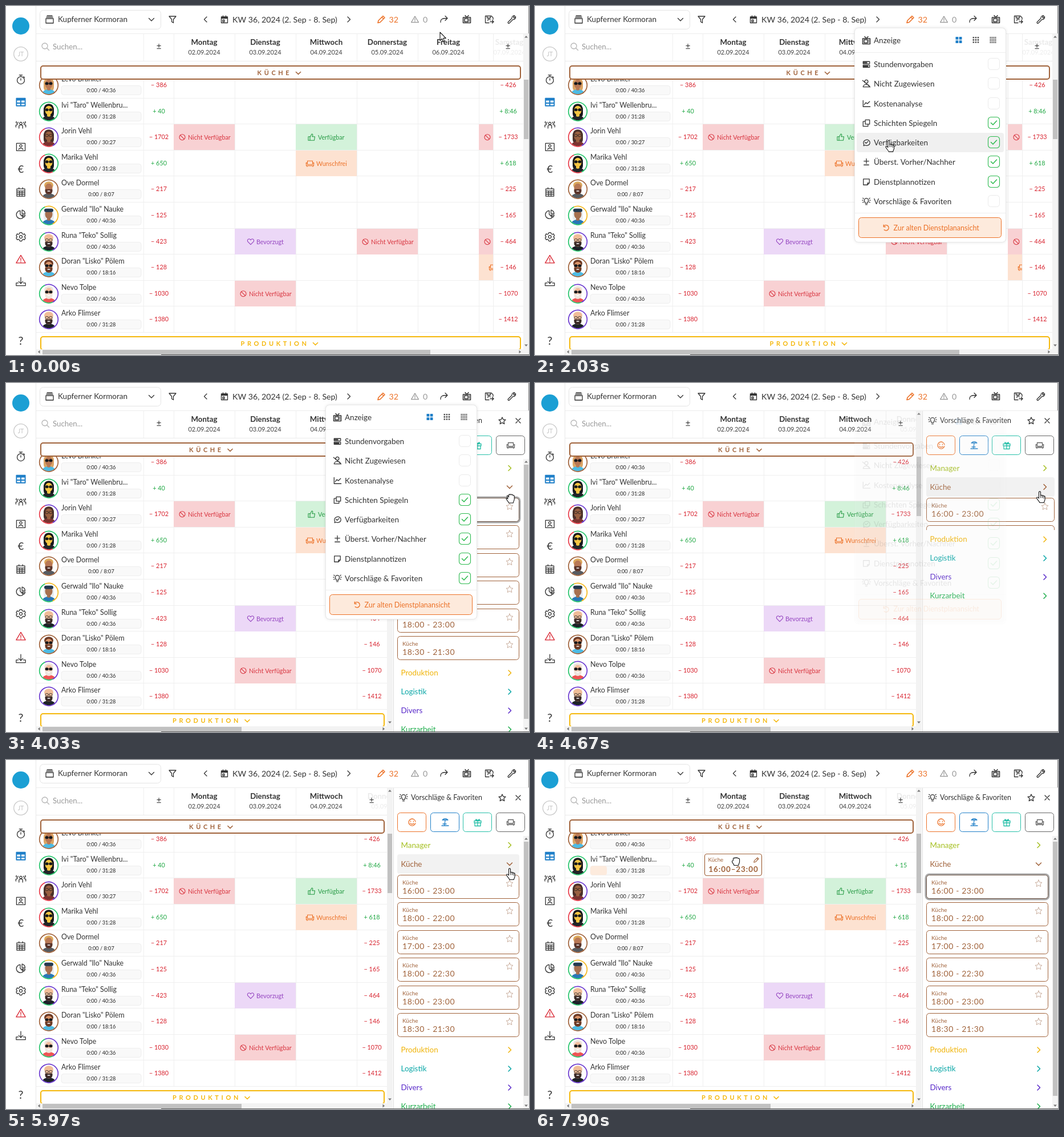
These frames come from a looping animation (917x611 px, 8000 ms). An HTML page with a canvas:

```html
<!DOCTYPE html>
<html lang="de">
<head>
<meta charset="utf-8">
<title>Dienstplan</title>
<style>
html, body { margin: 0; width: 100%; height: 100%; overflow: hidden; background: #fff; }
canvas { display: block; width: 917px; height: 611px; }
</style>
</head>
<body>
<canvas id="stage" width="917" height="611"></canvas>
<script>
const ctx = document.getElementById('stage').getContext('2d');
const LOOP = 8000, ROW = 45.6, TOP = 115.9, COL = 107, GRID_X = 294, LIST_H = 293;
const INK = '#333', RED = '#d8232f', GREEN = '#20a844', ORANGE = '#ec7127', BROWN = '#a0623a', BLUE = '#1f7fc8', LINE = '#efefef';

const ICONS = {
  down: 'M-4.5-2L0 2.5L4.5-2', right: 'M-2-4.5L2.5 0L-2 4.5', left: 'M2-4.5L-2.5 0L2 4.5',
  close: 'M-4-4L4 4M4-4L-4 4', check: 'M-5 0L-1.5 3.5L5-3.5',
  filter: 'M-6-5.5H6L1.5 0V6L-1.5 4V0Z',
  calendar: 'M-5.5-4.5H5.5V6H-5.5ZM-5.5-3.5H5.5M-5.5-2H5.5M-2.5-6.5V-4M2.5-6.5V-4M-3 1H0V4H-3Z',
  stack: 'M-6.5-1.5H6.5V6.5H-6.5ZM-5.5-4H5.5M-4.5-6.5H4.5',
  pencil: 'M-6 6L-5 2L3-6L6-3L-2 5ZM1-4L4-1',
  warn: 'M0-6.5L7.5 6H-7.5ZM0-2V2M0 3.7V4.4',
  share: 'M-6 5C-6-1-3-2 6-2M2-6L6-2L2 2',
  tv: 'M-6.5-3.5H6.5V6H-6.5ZM-3-7L0-3.5L3-7M-4-1.5H2V4H-4ZM4.3-1V0M4.3 2V3',
  save: 'M7 0V-3L4-6H-6.5V6H0M-3.5-6V-2.5H2.5V-6M-2 2A2 2 0 1 1 2 1M2 4H8M5.5 1.5L8 4L5.5 6.5',
  wrench: 'M-6.5 4.5L0-2A4 4 0 0 1 5-6.5L2.5-4L4-2.5L6.5-5A4 4 0 0 1 2 0L-4.5 6.5A1.4 1.4 0 0 1-6.5 4.5',
  search: 'M4-1A5 5 0 1 1-6-1A5 5 0 1 1 4-1M2.5 2.5L6.5 6.5',
  no: 'M5 0A5 5 0 1 1-5 0A5 5 0 1 1 5 0M-3.5-3.5L3.5 3.5',
  thumb: 'M-6-1H-3V5.5H-6ZM-3 0L0-5.5C2.5-6 2-3 1-1H5.5L4.5 5.5H-3',
  heart: 'M0 5L-5 0C-7.5-4-2-7 0-3C2-7 7.5-4 5 0Z',
  sofa: 'M-6.5-.5V4H6.5V-.5M-4.5 1.5V-4.5H4.5V1.5M-4 2H4M-7-.5A1.3 1.3 0 0 1-4.5 0M7-.5A1.3 1.3 0 0 0 4.5 0M-5 4V5.5M5 4V5.5',
  star: 'M0-6L1.8-2L6-1.6L2.9 1.3L3.8 5.6L0 3.4L-3.8 5.6L-2.9 1.3L-6-1.6L-1.8-2Z',
  bulb: 'M-2 3.5C-2 2-3.7 1-3.7-2A3.7 3.7 0 0 1 3.7-2C3.7 1 2 2 2 3.5ZM-1.5 6H1.5M-7.5-2H-6M6-2H7.5M-6.5-6L-5.2-5M6.5-6L5.2-5M-6.5 2L-5.2 1.2M6.5 2L5.2 1.2',
  smile: 'M5 3.5A6 6 0 1 1 6-1M-2.5-2V-1M2.5-2V-1M-3 2C-1 4 1 4 3 2M2 6L6 2',
  beach: 'M-5-4C-3-7 3-7 5-4ZM0-4L-1 5M-6 6H6M-4 3H2',
  gift: 'M-6-2.5H6V1H-6ZM-5 1V6.5H5V1M0-2.5V6.5M0-2.5C-6-3-3-8 0-2.5C3-8 6-3 0-2.5',
  hours: 'M-6-5H6V-1H-6ZM-6 1.5H6V5.5H-6ZM-6-4H1M-6-2.5H1M-6 3H3M-6 4.3H3',
  nobody: 'M3-4A3 3 0 1 1-3-4A3 3 0 1 1 3-4M-6 6C-6 0 6 0 6 6ZM-7-6L7 6',
  chart: 'M-6-6V5.5H7M-4 2L-1-2L2 0L6-4',
  copy: 'M-2-6H6V2H-2ZM-2-3H-6V6H3V2',
  chat: 'M-5 6L-4.5 3A6 5.3 0 1 1-2 5ZM-2.5-.5L-.5 1.5L3-2',
  plus: 'M0-6V3M-4.5-1.5H4.5M-4.5 5.5H4.5',
  note: 'M-5.5-5.5H5.5V2L2 5.5H-5.5ZM2 5.5V2H5.5',
  undo: 'M-5-5V-1.5H-1.5M-5-2A5 5 0 1 1-4 4',
  watch: 'M6 1A6 6 0 1 1-6 1A6 6 0 1 1 6 1M0 1V-2M-2.5-7.5H2.5M0-7.5V-5M4.5-5L6-3.5',
  table: 'M-7-6H7V6H-7ZM-7-5H7M-7-3.5H7M-7 1.5H7M0-3V6',
  users: 'M2-2A2 2 0 1 1-2-2A2 2 0 1 1 2-2M-3 6V3A3 2.5 0 0 1 3 3V6M-4.5-4A1.6 1.6 0 1 1-7-5M-8 4V1L-5-.5M4.5-4A1.6 1.6 0 1 0 7-5M8 4V1L5-.5',
  id: 'M-7-6H7V6H-7ZM2-2A2 2 0 1 1-2-2A2 2 0 1 1 2-2M-3.5 4C-3 1 3 1 3.5 4',
  month: 'M-6.5-5H6.5V7H-6.5ZM-6.5-1.5H6.5M-6.5 1.3H6.5M-6.5 4H6.5M-2-1.5V7M2-1.5V7M-3-7V-5M3-7V-5',
  pie: 'M-1-6A6.5 6.5 0 1 0 4 5L-1 0ZM2-7A7 7 0 0 1 7-1H2ZM2 1H7A7 7 0 0 1 5.5 4.5Z',
  gear: 'M-1.5-7H1.5L2.2-5L4-4L6-4.8L7.5-2L6 0L7.5 2L6 4.8L4 4L2.2 5L1.5 7H-1.5L-2.2 5L-4 4L-6 4.8L-7.5 2L-6 0L-7.5-2L-6-4.8L-4-4L-2.2-5ZM2.3 0A2.3 2.3 0 1 1-2.3 0A2.3 2.3 0 1 1 2.3 0',
  load: 'M0-7V3M-3.5-.5L0 3L3.5-.5M-4 2H-7.5V6.5H7.5V2H4',
  arrow: 'M0 0V14.5L3.4 11.3L5.8 16.6L8 15.6L5.7 10.4H10.3Z',
  hand: 'M-1.5 1.3C-1.5-.6 1.5-.6 1.5 1.3V7C2 5.8 4 6 4.2 7.4C5 6.3 6.7 6.8 6.8 8.2C8 7.4 9.3 8 9.3 9.5V13C9.3 16 7.5 17 7.3 19.5H-.2C-.5 17-5.5 13.5-5.5 11C-5.2 9.3-3 9.8-1.5 12Z',
  knuckles: 'M1.7 7V11M4.5 8V11M7.1 9V12',
  grab: 'M-4 1L-5.5-4C-5-6-3.5-5-2.5-2V-6C-2-7.5-.2-7.5 0-6C.5-8 2.5-7.5 2.6-6C3.5-7 5-6.5 5-5C6.3-5.7 7.4-5 7.3-3.5V1C7.3 4 5.5 5 5.3 8H-2.5C-3 5-7.5 2-7 .3C-6.5-1-5-.5-4 1Z',
  fist: 'M-4.5-1V-4C-4-6-2-6-1.5-5C-1-6.5 1-6.5 1.5-5.2C2-6.3 4-6 4.2-4.5C5.5-5.2 6.7-4.2 6.6-3V1C6.6 4 5 4.5 4.8 7.5H-3C-3.2 5-6.7 3-6.5 .5C-6.3-.8-5.5-1-4.5-1Z'
};
for (const key in ICONS) ICONS[key] = new Path2D(ICONS[key]);

const DAYS = ['Montag', 'Dienstag', 'Mittwoch', 'Donnerstag', 'Freitag', 'Samstag'];
const AVATARS = {
  long: { hair: '#17191c', skin: '#f5c542', body: '#202428', long: 1, shades: 1 },
  bald: { hair: '#f0bd98', skin: '#f0bd98', body: '#1d2228', beard: '#3b2a27', glasses: 1 }
};
const STAFF = [
  ['Levo Brankel', '0:00 / 40:36', '−386', '−426', BROWN, BROWN, { hair: '#dba565', skin: '#b97855', body: '#4dbbe4', long: 1, shades: 1 }],
  ['Ivi "Taro" Wellenbru...', '0:00 / 31:28', '+40', '+8:46', '#25c46a', '#25c46a', AVATARS.long],
  ['Jorin Vehl', '0:00 / 30:27', '−1702', '−1733', '#6b39cf', '#e83c4a', { hair: '#4b3029', skin: '#9a6041', body: '#7c3330', long: 1, glasses: 1 }],
  ['Marika Vehl', '0:00 / 31:28', '+650', '+618', '#25c46a', '#e83c4a', AVATARS.long],
  ['Ove Dormel', '0:00 / 8:07', '−217', '−225', BROWN, BROWN, { hair: '#dca85c', skin: '#b87856', body: '#565b61', beard: '#5a342a' }],
  ['Gerwald "Ilo" Nauke', '0:00 / 40:36', '−125', '−165', '#f4b71d', '#25c46a', { hair: '#e9edf0', skin: '#a7704f', body: '#2878b7', long: 1, band: 1 }],
  ['Runa "Teko" Sollig', '0:00 / 40:36', '−423', '−464', '#6b39cf', '#25c46a', AVATARS.bald],
  ['Doran "Lisko" Pölem', '0:00 / 18:16', '−128', '−146', BROWN, BROWN, { hair: '#6c3a25', skin: '#d89368', body: '#4dbbe4', beard: '#6c3a25', shades: 1 }],
  ['Nevo Tolpe', '0:00 / 40:36', '−1030', '−1070', '#6b39cf', '#25c46a', { hair: '#eee5dc', skin: '#f2bc9b', body: '#ee5555', beard: '#eee5dc', shades: 1 }],
  ['Arko Flimser', '0:00 / 31:28', '−1380', '−1412', '#6b39cf', '#6b39cf', AVATARS.bald]
];
const KINDS = {
  no: ['Nicht Verfügbar', '#f8d1d3', '#d8343f', 15, 25],
  thumb: ['Verfügbar', '#d3f2da', '#279b45', 28, 39],
  sofa: ['Wunschfrei', '#fde2d1', ORANGE, 25, 36],
  heart: ['Bevorzugt', '#ecd8f7', '#9444c0', 28, 38]
};
const CELLS = [[2, 0, 'no'], [2, 2, 'thumb'], [3, 2, 'sofa'], [6, 1, 'heart'], [6, 3, 'no'], [8, 1, 'no'], [2, 5, 'no'], [6, 5, 'no'], [7, 5, 'sofa']];
const OPTIONS = [['hours', 'Stundenvorgaben'], ['nobody', 'Nicht Zugewiesen'], ['chart', 'Kostenanalyse'], ['copy', 'Schichten Spiegeln'],
  ['chat', 'Verfügbarkeiten'], ['plus', 'Überst. Vorher/Nachher'], ['note', 'Dienstplannotizen'], ['bulb', 'Vorschläge & Favoriten']];
const SHIFTS = ['16:00 - 23:00', '18:00 - 22:00', '17:00 - 23:00', '18:00 - 22:30', '18:00 - 23:00', '18:30 - 21:30'];
const AREAS = [['Produktion', '#f0b40a'], ['Logistik', '#08a6a6'], ['Divers', '#5a2bca'], ['Kurzarbeit', '#1fae4d']];

const span = (t, a, b) => Math.min(1, Math.max(0, (t - a) / (b - a)));
const easeOut = p => 1 - (1 - p) ** 3;
const easeInOut = p => p * p * (3 - 2 * p);
const rowTop = i => Math.round(TOP + i * ROW);

function text(s, x, y, size, color = INK, align = 'left', weight = 400, space = 0) {
  ctx.font = `${weight} ${size}px Lato, "Open Sans", sans-serif`;
  ctx.letterSpacing = space + 'px';
  ctx.textAlign = align;
  ctx.fillStyle = color;
  ctx.fillText(s, x, y + size * 0.36);
}
function box(x, y, w, h, r, fill, stroke, lw = 1) {
  ctx.beginPath();
  ctx.roundRect(x, y, w, h, r);
  if (fill) { ctx.fillStyle = fill; ctx.fill(); }
  if (stroke) { ctx.strokeStyle = stroke; ctx.lineWidth = lw; ctx.stroke(); }
}
function icon(name, x, y, color = INK, scale = 1, lw = 1.3, fill) {
  ctx.save();
  ctx.translate(x, y);
  ctx.scale(scale, scale);
  ctx.lineWidth = lw / scale;
  ctx.lineCap = ctx.lineJoin = 'round';
  if (fill) { ctx.fillStyle = fill; ctx.fill(ICONS[name]); }
  ctx.strokeStyle = color;
  ctx.stroke(ICONS[name]);
  ctx.restore();
}
function disc(x, y, r, color, ry = r) {
  ctx.fillStyle = color;
  ctx.beginPath();
  ctx.ellipse(x, y, r, ry, 0, 0, 7);
  ctx.fill();
}
function clipped(x, y, w, h, draw) {
  ctx.save();
  ctx.beginPath();
  ctx.rect(x, y, w, h);
  ctx.clip();
  draw();
  ctx.restore();
}
function triangle(x, y, angle) {
  ctx.save();
  ctx.translate(x, y);
  ctx.rotate(angle);
  ctx.fillStyle = '#777';
  ctx.fill(new Path2D('M-3 1.5L0-2L3 1.5Z'));
  ctx.restore();
}

function cursorAt(t) {
  let x = 761, y = 46;
  const move = (a, b, tx, ty) => {
    const p = easeInOut(span(t, a, b));
    x += (tx - x) * p;
    y += (ty - y) * p;
  };
  move(100, 500, 813, 23);
  if (t > 1570) {
    const p = easeInOut(span(t, 1570, 2370)), q = 1 - p;
    x = q * q * 813 + 2 * p * q * 460 + p * p * 746;
    y = q * q * 23 + 2 * p * q * 230 + p * p * 327;
  }
  move(2400, 2700, 747, 336);
  move(3100, 3700, 884, 190);
  move(3730, 3900, 884, 202);
  move(4200, 4400, 885, 190);
  move(5200, 5400, 883, 190);
  move(5970, 6530, 837, 215);
  move(6930, 7730, 352, 177);
  return { x, y };
}
function stateAt(t) {
  const { x, y } = cursorAt(t), dragging = t >= 6770;
  const open = easeOut(span(t, 3030, 3480)) - easeOut(span(t, 4547, 4847)) + easeOut(span(t, 5200, 5630));
  return {
    t, x, y, dragging, listH: open * LIST_H,
    panel: t >= 2930, dropped: t >= 7770,
    menu: t < 4490 ? easeOut(span(t, 1100, 1400)) : 1 - easeOut(span(t, 4490, 4840)),
    expanded: (t >= 2930 && t < 4520) || t >= 5200,
    onCard: t > 3730 && y > 200 || dragging,
    onArea: t > 3100 && x > 826 && y > 165 && y < 200 && !dragging
  };
}

function avatar(x, y, [c1, c2], look) {
  ctx.save();
  ctx.beginPath();
  ctx.arc(x, y, 15.5, 0, 7);
  ctx.clip();
  if (look.long) box(x - 9, y - 12, 18, 24, 8, look.hair);
  disc(x, y + 16, 12, look.body, 9);
  box(x - 3, y + 1, 6, 8, 2, look.skin);
  disc(x, y - 7, 8, look.hair, 6.5);
  disc(x, y - 2, 6.5, look.skin, 8);
  if (look.band) box(x - 8, y - 12, 16, 6, 3, '#243a50');
  if (look.beard) {
    box(x - 6.5, y, 13, 9, [1, 1, 6, 6], look.beard);
    box(x - 2.5, y + 2.5, 5, 1.5, 1, '#fff');
  }
  const lens = look.shades ? '#15181b' : null;
  if (look.shades || look.glasses) {
    box(x - 6, y - 5, 5.2, 4, 1.5, lens, '#15181b', .8);
    box(x + .8, y - 5, 5.2, 4, 1.5, lens, '#15181b', .8);
  }
  ctx.restore();
  ctx.lineWidth = 1.7;
  [c1, c2].forEach((c, i) => {
    ctx.strokeStyle = c;
    ctx.beginPath();
    ctx.arc(x, y, 16.3, -2 + i * Math.PI, -2 + (i + 1) * Math.PI);
    ctx.stroke();
  });
}

function sidebar() {
  disc(26, 35, 15, '#1b9fd4');
  ctx.strokeStyle = '#c8c8c8';
  ctx.lineWidth = 1.3;
  ctx.beginPath();
  ctx.arc(26, 84, 12.3, 0, 7);
  ctx.stroke();
  text('JT', 26, 84, 10.5, '#c4c4c4', 'center');
  ['watch', 'table', 'users', 'id', '', 'month', 'pie', 'gear', 'warn', 'load'].forEach((name, i) => {
    const color = name === 'table' ? BLUE : name === 'warn' ? RED : INK;
    if (name) icon(name, 26, 129 + i * 39.3, color, 1.08, name === 'table' ? 2 : 1.3);
    else text('€', 26, 286, 18, INK, 'center');
  });
  text('?', 26, 586, 20, INK, 'center');
  box(52, 0, 1, 611, 0, '#e9e9e9');
}

function toolbar(s) {
  box(59.5, 7.5, 212, 33, 6, '#fff', '#e4e4e4');
  icon('stack', 76.5, 23.5);
  text('Kupferner Kormoran', 91, 23.5, 13.5);
  icon('down', 255, 23.5);
  icon('filter', 292, 23.5);
  icon('left', 350, 23.5);
  icon('calendar', 383, 23.5);
  text('KW 36, 2024 (2. Sep - 8. Sep)', 397, 23.5, 14.2);
  icon('right', 601, 23.5);
  icon('pencil', 658, 23.5, ORANGE, 1, 1.6);
  text(s.t >= 7800 ? '33' : '32', 671.5, 23.5, 14.2, ORANGE);
  icon('warn', 717, 23.5, '#999', .85);
  text('0', 731, 23.5, 14.2, '#999');
  icon('share', 768, 23.5);
  if (s.t > 450 && s.t < 1680) box(792, 8, 32, 32, 5, s.t < 900 ? '#f5f5f5' : '#eee');
  icon('tv', 808, 23.5, INK, 1, 1.5);
  icon('save', 847, 23.5);
  icon('wrench', 887, 23.5);
  box(53, 48, 864, 1, 0, '#ededed');
}

function sectionBar(label, y, center, color, dx, chevron) {
  box(61, y + 1, center * 2 - 122, 23, 4, '#fff', color, 2);
  text(label, center + dx, y + 13.3, 11, color, 'left', 700, 4.6);
  icon('down', center + chevron, y + 13.3, color, .9, 1.6);
}

function cell(row, col, kind) {
  const [label, bg, color, ix, tx] = KINDS[kind], x = GRID_X + col * COL, y = rowTop(row);
  box(x, y, COL, 45, 0, bg);
  icon(kind, x + ix, y + 22.7, color, 1, 1.1);
  text(label, x + tx, y + 22.7, 10.7, color);
}

function staffRow([name, hours, before, , c1, c2, look], i, s) {
  const y = rowTop(i), booked = s.dropped && i === 1;
  avatar(75, y + 22.7, [c1, c2], look);
  text(name, 97, y + 11.3, 12.4);
  box(97, y + 23.5, 140, 16, 4, '#f9f9f9', '#eee');
  if (booked) box(97, y + 23.5, 29, 16, 4, '#fdebdd');
  text(booked ? hours.replace('0:00', '6:30') : hours, 167, y + 31.7, 9.2, '#222', 'center');
  balance(before, 268, y);
  box(53, rowTop(i + 1) - 1, 854, 1, 0, LINE);
}
function balance(value, x, y) {
  text(value[0] + ' ' + value.slice(1), x, y + 22.5, 10.8, value[0] === '+' ? GREEN : RED, 'center');
}

function dayHead(day, k) {
  const x = GRID_X + (k + .5) * COL;
  text(day, x, 63, 13.3, INK, 'center', 700);
  text(`0${k + 2}.09.2024`, x, 81, 11, '#444', 'center');
}

function grid(s) {
  const W = s.panel ? 668 : 907, side = W - 53, center = (W + 56) / 2;
  clipped(53, 49, side - 53, 552, () => {
    STAFF.forEach((person, i) => staffRow(person, i, s));
    box(53, 49, W, 48, 0, '#fff');
    box(241, 49, 1, 523, 0, LINE);
    DAYS.forEach((day, k) => {
      box(GRID_X + k * COL, 49, 1, 523, 0, LINE);
      dayHead(day, k);
    });
    CELLS.forEach(c => cell(...c));
  });
  // The pinned balance column lets the next day's header shimmer through.
  clipped(side, 49, 53, 552, () => {
    ctx.globalAlpha = .1;
    DAYS.forEach(dayHead);
    ctx.globalAlpha = 1;
    STAFF.forEach((person, i) => {
      balance(s.dropped && i === 1 ? '+15' : person[3], W - 26.5, rowTop(i));
      box(side, rowTop(i + 1) - 1, 53, 1, 0, LINE);
    });
    box(side, 49, 1, 523, 0, LINE);
    text('±', W - 27, 71, 15, INK, 'center');
  });
  box(53, 96, W - 53, 1, 0, '#eaeaea');
  icon('search', 69, 71, '#b5b5b5');
  text('Suchen...', 82, 71, 13.3, '#999');
  text('±', 268, 71, 15, INK, 'center');
  box(54, 97, W - 54, 30, 0, '#fff');
  sectionBar('KÜCHE', 104, center, BROWN, -41, 31);
  clipped(53, 572, W - 53, 29, () => {
    ctx.globalAlpha = s.t >= 6930 && !s.dropped ? .45 : 1;
    sectionBar('PRODUKTION', 578, center, '#f5b80c', -70, 61);
  });
  box(W, 49, 10, 552, 0, '#f3f3f3');
  box(W + 1, 129, 8, 104, 0, '#c1c1c1');
  triangle(W + 5, 54, 0);
  triangle(W + 5, 594, Math.PI);
  box(53, 601, W - 43, 9, 0, '#f3f3f3');
  box(64, 602, s.panel ? 349 : 680, 8, 0, '#c1c1c1');
  triangle(58, 605.5, -Math.PI / 2);
  triangle(W - 6, 605.5, Math.PI / 2);
}

function shiftCard(label, top, right, active) {
  const y = Math.round(top);
  if (active) box(685.5, y - .5, right - 685, 43, 6, '#fff', '#aaa', 4);
  box(686.5, y + .5, right - 687, 41, 5, '#fff', active ? '#6e5546' : BROWN);
  text('Küche', 695, y + 13, 10, BROWN);
  text(label, 695, y + 28, 14, BROWN, 'left', 400, .6);
  icon('star', right - 17, y + 15, '#c9ad9c', 1, 1);
}
function area(label, y, color, right, open) {
  text(label, 692.5, y, 13.4, color);
  icon(open ? 'down' : 'right', right - 17, y, color, 1, 1.5);
}
function panel(s) {
  const scroll = s.listH > 276, right = scroll ? 900 : 911;
  box(679, 49, 238, 562, 0, '#fff');
  box(679, 49, 1, 562, 0, '#ddd');
  icon('bulb', 697, 66, INK, .95);
  text('Vorschläge & Favoriten', 710, 66, 12.4);
  icon('star', 870, 66);
  icon('close', 898, 66);
  [['smile', ORANGE], ['beach', BLUE], ['gift', '#25bfa8'], ['sofa', '#666']].forEach(([name, color], i) => {
    const x = Math.round(686 + i * 57.6) + .5;
    box(x, 92.5, 50, 33, 5, '#fff', color);
    icon(name, x + 25.5, 109, color);
  });
  clipped(680, 133, 237, 477, () => {
    area('Manager', 149, '#a5bf20', right);
    if (s.onArea) box(686, 165, right - 686, 34, 4, '#f2f2f2');
    area('Küche', 182, BROWN, right, s.expanded);
    clipped(680, 198, 237, s.listH, () => SHIFTS.forEach((label, i) => shiftCard(label, 201 + i * 48.4, right, i === 0 && s.onCard)));
    AREAS.forEach(([label, color], i) => area(label, 214.5 + i * 33 + s.listH, color, right));
    if (scroll) {
      box(907, 133, 10, 477, 0, '#f3f3f3');
      box(908, 143, 8, 445, 0, '#c1c1c1');
      triangle(912, 138, 0);
      triangle(912, 605, Math.PI);
    }
  });
}

function dots(n, x, size, gap, color) {
  for (let i = 0; i < n * n; i++) {
    box(x + (i % n) * gap, 54 + Math.floor(i / n) * gap, size, size, .5, color);
  }
}
function menu(s) {
  ctx.save();
  ctx.globalAlpha = s.menu;
  ctx.translate(0, 9 * (1 - s.menu));
  ctx.shadowColor = 'rgba(0,0,0,.14)';
  ctx.shadowBlur = 6;
  box(561, 39, 264, 374, 6, '#fff');
  ctx.shadowColor = 'transparent';
  box(560.5, 38.5, 265, 375, 6, null, '#e8e8e8');
  icon('tv', 581, 60.5, INK, 1, 1.5);
  text('Anzeige', 594, 60.5, 13.5);
  dots(2, 737.5, 4.8, 6.2, BLUE);
  dots(3, 767.5, 2.6, 4.1, '#555');
  dots(4, 797.5, 2, 3, '#555');
  box(561, 81, 264, 1, 0, '#eee');
  OPTIONS.forEach(([name, label], i) => {
    const y = Math.round(102 + i * 34.28), checked = i > 2 && i < 7 ? 1 : i === 7 ? span(s.t, 2900, 3130) : 0;
    if (s.menu === 1 && s.x > 564 && s.x < 822 && Math.abs(s.y - y) < 17) box(564, y - 17, 258, 34, 4, '#f0f0f0');
    icon(name, 581, y, INK, .95);
    text(label, 594, y, 13.5);
    box(794.5, y - 10.5, 20, 20, 5, null, '#eaeaea');
    if (checked) {
      ctx.globalAlpha = s.menu * checked;
      box(794.5, y - 10.5, 20, 20, 5, null, '#2dbb4f', 1.1);
      icon('check', 804.5, y - .5, '#2dbb4f', 1, 1.5);
      ctx.globalAlpha = s.menu;
    }
  });
  box(561, 362, 264, 1, 0, '#eee');
  box(567.5, 370.5, 250, 35, 5, '#fdeadc', ORANGE);
  icon('undo', 616, 388, ORANGE, .95);
  text('Zur alten Dienstplanansicht', 628.5, 388, 12.5, ORANGE);
  ctx.restore();
}

function bookedCard(x, y) {
  box(x + .5, y + .5, 100, 38, 4, '#fff', BROWN, 1.2);
  text('Küche', x + 6.5, y + 11, 9.7, BROWN);
  icon('pencil', x + 91, y + 11, BROWN, .7, 1.1);
  text('16:00–23:00', x + 51, y + 27, 13.5, BROWN, 'center', 700, .9);
}

function drawCursor(s) {
  const name = s.t < 420 ? 'arrow' : s.dragging ? 'fist' : s.onCard ? 'grab' : 'hand';
  icon(name, s.x, s.y, '#111', 1, 1.1, '#fff');
  if (name === 'hand') icon('knuckles', s.x, s.y, '#222', 1, 1);
}

function draw(t) {
  const s = stateAt(t);
  box(0, 0, 917, 611, 0, '#fff');
  toolbar(s);
  sidebar();
  grid(s);
  if (s.panel) panel(s);
  if (s.dropped) bookedCard(297, 164);
  if (s.menu > 0) menu(s);
  box(272, 610, 645, 1, 0, '#666');
  box(916, 0, 1, 48, 0, '#888');
  if (t >= 6930 && !s.dropped) {
    ctx.globalAlpha = .75;
    bookedCard(s.x - 83, s.y - 13);
    ctx.globalAlpha = 1;
  }
  drawCursor(s);
}

const start = performance.now();
function tick() {
  draw((performance.now() - start) % LOOP);
  requestAnimationFrame(tick);
}
tick();
</script>
</body>
</html>
```
